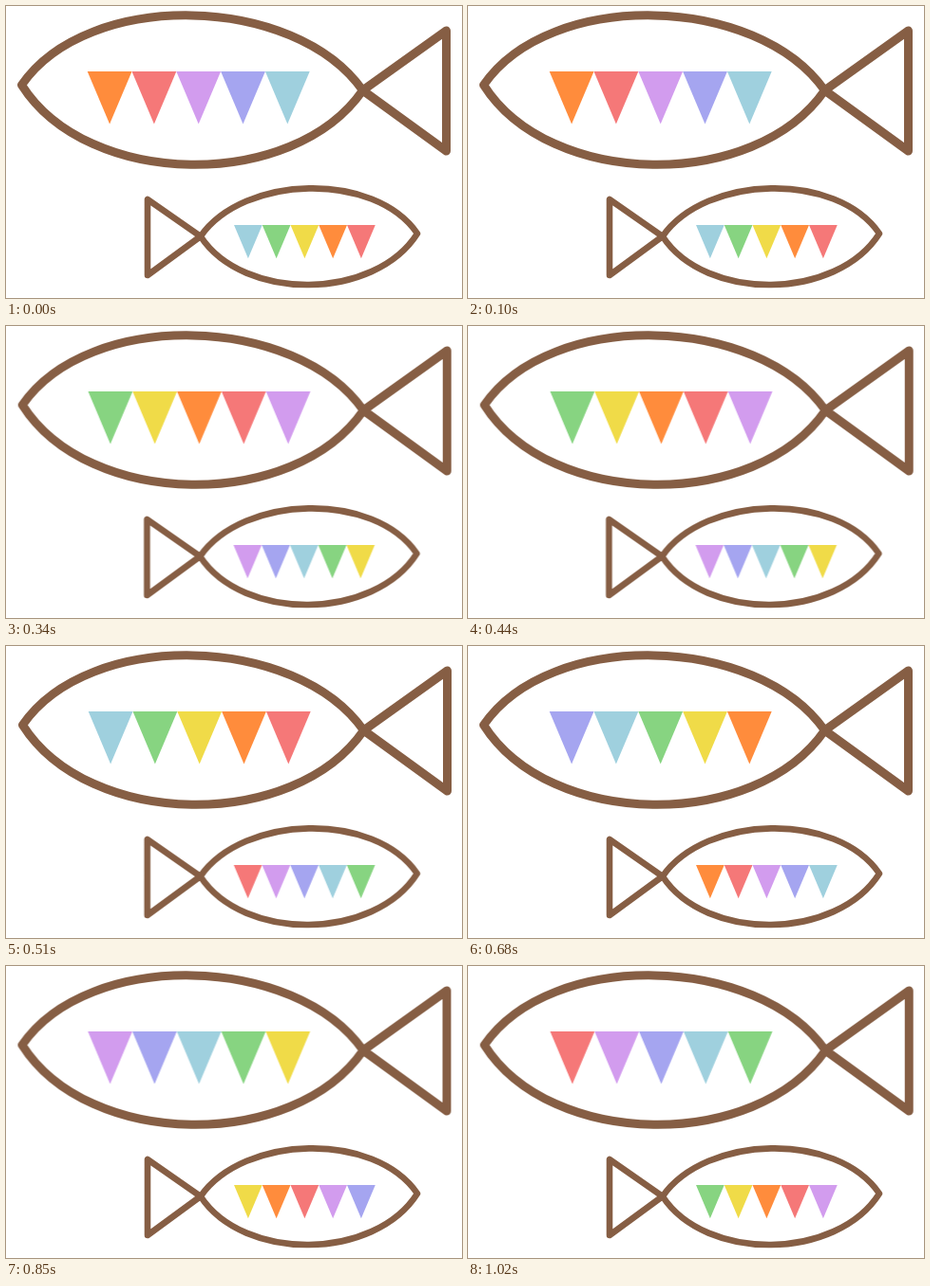
An HTML page that plays this animation: 480 px wide and 308 px high, repeating every 1190 ms.

```html
<!DOCTYPE html>
<html lang="en">
<head>
<meta charset="utf-8">
<title>Two fish with bunting</title>
<style>
  html, body { margin: 0; width: 100%; height: 100%; overflow: hidden; background: #fff; }
  svg { display: block; width: 480px; height: 308px; }
  .outline { fill: none; stroke: #865e44; stroke-linejoin: round; stroke-linecap: round; }
  .big { stroke-width: 9px; animation: sway 1190ms step-end infinite; }
  .small { stroke-width: 6.6px; animation: nudge 1190ms step-end infinite; }
  .flag {
    stroke: none;
    animation: hue 1190ms step-end infinite;
    animation-delay: calc(var(--shift) * -170ms);
  }
  @keyframes hue {
    0% { fill: #ff8c3c; }
    14.2857% { fill: #f0db48; }
    28.5714% { fill: #87d481; }
    42.8571% { fill: #9fd0de; }
    57.1428% { fill: #a5a5f0; }
    71.4285% { fill: #d29cee; }
    85.7142% { fill: #f57878; }
  }
  @keyframes sway {
    0%, 57.1428% { transform: translateX(0); }
    14.2857%, 71.4285% { transform: translateX(.45px); }
    28.5714%, 85.7142% { transform: translateX(.7px); }
    42.8571% { transform: translateX(1px); }
  }
  @keyframes nudge {
    0%, 57.1428% { transform: translateX(0); }
    28.5714% { transform: translateX(-.6px); }
    42.8571% { transform: translateX(-.3px); }
  }
</style>
</head>
<body>
<svg viewBox="0 0 480 308">
  <g class="big" id="big">
    <path class="outline" d="M375.5 89C304 -13 86 -18 16.5 83.3C86 193 302 195.5 375.5 89L463.5 26V153Z"/>
  </g>
  <g class="small" id="small">
    <path class="outline" d="M204.8 243C250 178 388 174 433 240C388 311 250 312 204.8 243L149 204V284Z"/>
  </g>
</svg>
<script>
  const COUNT = 5;

  function bunting(id, x, y, w, h, shift) {
    const group = document.getElementById(id);
    for (let i = 0; i < COUNT; i++) {
      const flag = document.createElementNS('http://www.w3.org/2000/svg', 'path');
      flag.setAttribute('class', 'flag');
      flag.setAttribute('d', `M${x + i * w} ${y}h${w}l${-w / 2} ${h}z`);
      flag.style.setProperty('--shift', shift - i);
      group.append(flag);
    }
  }

  bunting('big', 85.7, 69, 46.8, 55.5, 7);
  bunting('small', 240, 231, 29.75, 35.3, 10);
</script>
</body>
</html>
```
